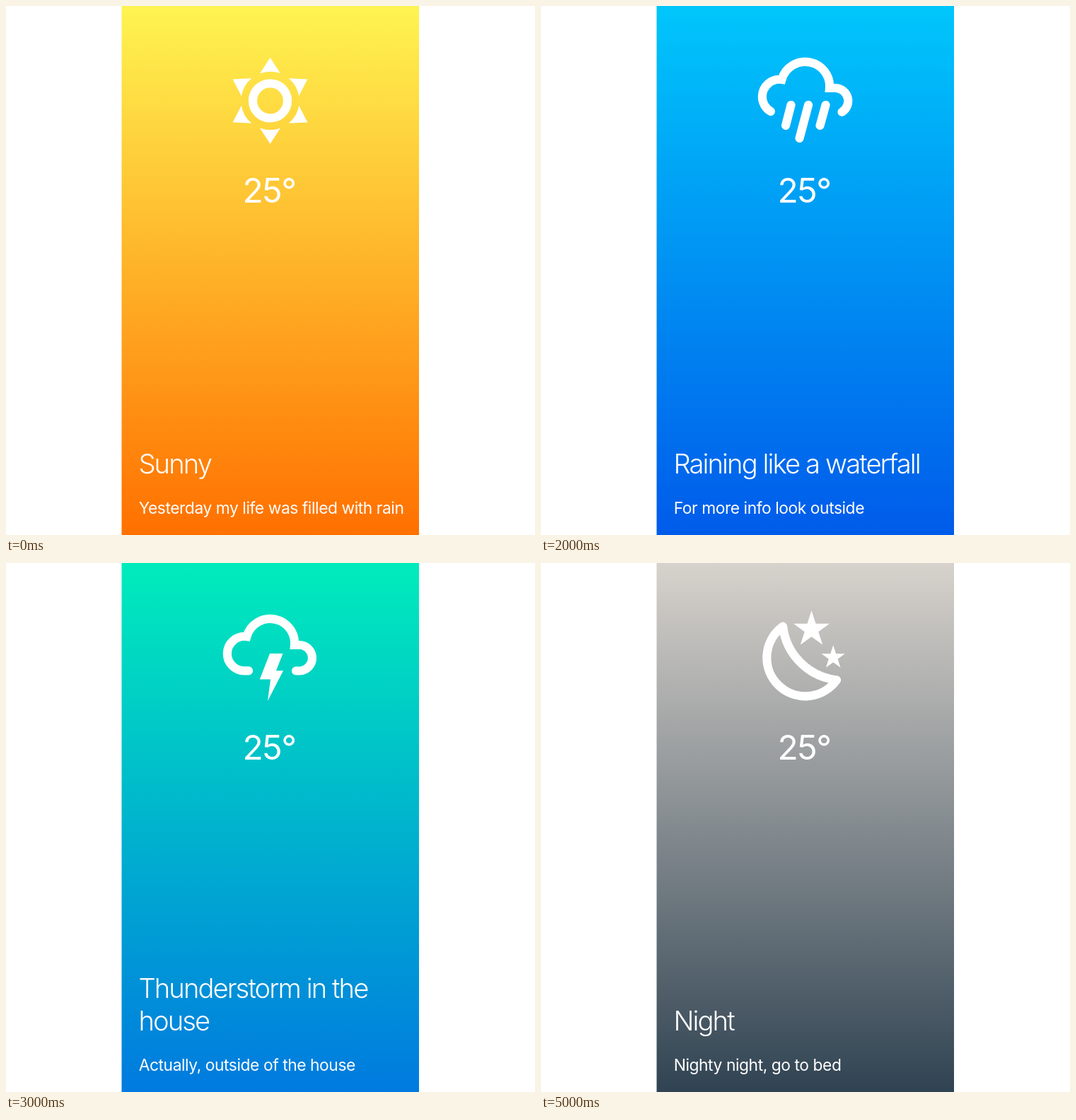
Animation, 748 px wide and 748 px high, one loop 6 s. Source, as an HTML page:

```html
<!DOCTYPE html>
<html lang="en">
<head>
<meta charset="utf-8">
<title>Weather cards</title>
<style>
  html, body { margin: 0; width: 100%; height: 100%; overflow: hidden; background: #fff; }
  .strip { animation: flip 6s steps(6, end) infinite; }
  @keyframes flip { to { transform: translateY(-4488px); } }
  .card {
    box-sizing: border-box; width: 421px; height: 748px; margin-left: 163px;
    overflow: hidden; border-left: 1px solid rgba(255, 255, 255, .5);
    background: linear-gradient(var(--top), var(--bottom));
  }
  .sunny { --top: #fef451; --bottom: #ff7000; }
  .snowy { --top: #7de2fc; --bottom: #b9b6e5; }
  .rainy { --top: #00c6fb; --bottom: #005bea; }
  .storm { --top: #00ecbc; --bottom: #007adf; }
  .night { --top: #d7d2cc; --bottom: #304352; }
  svg { display: block; width: 420px; height: 748px; }
  .line {
    fill: none; stroke: #fff; stroke-width: 12.2;
    stroke-linecap: round; stroke-linejoin: miter;
  }
  .solid { fill: #fff; }
  text {
    fill: #fff; font-family: Inter, "Open Sans", sans-serif;
    font-optical-sizing: none;
  }
  .temp { font-size: 48px; font-weight: 400; letter-spacing: -.03em; }
  .title { font-size: 38.2px; font-weight: 300; letter-spacing: -.05em; }
  .note { font-size: 22.8px; font-weight: 400; letter-spacing: -.019em; }
</style>
</head>
<body>
<div class="strip" id="strip"></div>
<script>
  const line = (d, extra = '') => `<path class="line" d="${d}" ${extra}/>`;
  const solid = (d, extra = '') => `<path class="solid" d="${d}" ${extra}/>`;

  // Cloud outline; the two ends differ between the icons.
  const cloud = (start, end, extra) => line(
    `${start} A24.4 24.4 0 0 1 312.8 128 A24.4 24.4 0 0 1 340.4 104
     A34.5 34.5 0 0 1 408 116 H416 ${end}`, extra);
  const hook = 'A18.3 18.3 0 0 1 416 152.5 H410';

  function star(cx, cy, r) {
    const points = Array.from({ length: 10 }, (_, i) => {
      const a = i * Math.PI / 5, d = i % 2 ? r * 0.385 : r;
      return `${(cx + d * Math.sin(a)).toFixed(2)} ${(cy - d * Math.cos(a)).toFixed(2)}`;
    });
    return solid(`M${points.join('L')}Z`);
  }

  const rays = [0, 60, 120, 180, 240, 300].map(angle =>
    solid('M373.5 73 L388 95.4 A41 41 0 0 0 359 95.4 Z',
      `transform="rotate(${angle} 373.5 134)"`)).join('');

  const icons = {
    sun: rays + '<circle class="line" cx="373.5" cy="134" r="24.5"/>',
    snow: cloud('M337 152.4', hook) +
      line('M380 147 L367 194 M350.5 177 L397.5 164.5 M356.5 153.5 L391 188'),
    rain: cloud('M324.8 149.1', 'A18.3 18.3 0 0 1 425.5 149.9') +
      line('M353.5 140 L346 169 M378 140 L365.5 187 M402.5 140 L394.5 169'),
    bolt: cloud('M343 152.4 H337', hook) +
      solid('M373 128 H391.5 L382 152.3 H392 L370 195 L374 164.5 H358.8 Z'),
    mist: '<clipPath id="horizon"><rect x="163" width="421" height="140.2"/></clipPath>' +
      `<g clip-path="url(#horizon)">${cloud('M337 152.4', hook, 'transform="translate(0 6.2)"')}</g>` +
      line('M319 158.5 H379.5 M398 158.5 H428.5 M319 183 H331 M349.5 183 H428.5'),
    moon: line('M342 89.7 A54.4 54.4 0 1 0 418 165.5 A87 87 0 0 1 342 89.7 Z',
      'style="stroke-linejoin:round"') +
      star(382.5, 94, 26.7) + star(413.2, 133.7, 17.5)
  };

  const cards = [
    ['sunny', 'sun', ['Sunny'], 'Yesterday my life was filled with rain'],
    ['snowy', 'snow', ['Snowy'], 'Who would like some warm cocoa?'],
    ['rainy', 'rain', ['Raining like a waterfall'], 'For more info look outside'],
    ['storm', 'bolt', ['Thunderstorm in the', 'house'], 'Actually, outside of the house'],
    ['rainy', 'mist', ['Misty Mist'], "It's like you have no glasses on"],
    ['night', 'moon', ['Night'], 'Nighty night, go to bed']
  ];

  const label = (kind, x, y, words) =>
    `<text class="${kind}" x="${x}" y="${y}">${words}</text>`;

  document.getElementById('strip').innerHTML = cards.map(([sky, icon, title, note]) => `
    <div class="card ${sky}"><svg viewBox="164 0 420 748">
      ${icons[icon]}
      ${label('temp', 334.5, 278, '25°')}
      ${title.map((words, i) =>
        label('title', 187.4, 661 - 46 * (title.length - 1 - i), words)).join('')}
      ${label('note', 187.7, 718, note)}
    </svg></div>`).join('');
</script>
</body>
</html>
```
